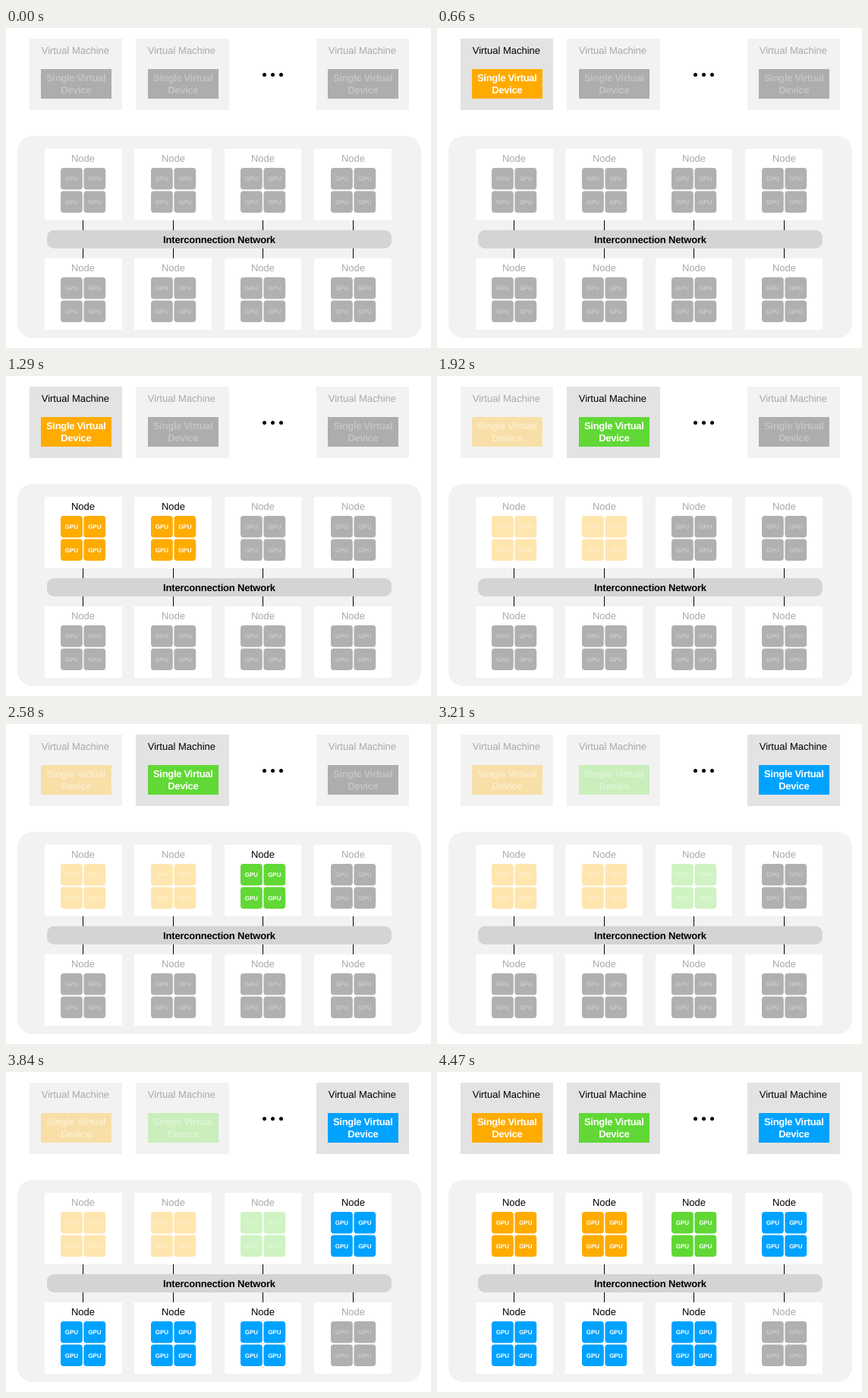
Recreate the animation shown at these times as an HTML page. Size 560 px wide and 421 px high, loop 5130 ms.

```html
<!DOCTYPE html>
<html lang="en">
<head>
<meta charset="utf-8">
<title>Virtual devices on a GPU cluster</title>
<style>
  html, body { margin: 0; width: 100%; height: 100%; overflow: hidden; background: #fff; }
  svg { display: block; width: 560px; height: 421px; }
  text {
    font: 13px "Liberation Sans", Arial, sans-serif;
    text-anchor: middle;
    text-rendering: geometricPrecision;
  }
  .bold { font-weight: 700; letter-spacing: -.3px; }
  .net { font-weight: 700; letter-spacing: -.2px; }
  .gpu { font-size: 8px; font-weight: 700; }
</style>
</head>
<body>
<svg id="stage" viewBox="0 0 560 421"></svg>
<script>
const stage = document.getElementById('stage');

function add(tag, attrs, label) {
  const el = document.createElementNS('http://www.w3.org/2000/svg', tag);
  for (const k in attrs) el.setAttribute(k, attrs[k]);
  if (label) el.textContent = label;
  return stage.appendChild(el);
}
const rect = (x, y, width, height, fill, rx = 0) => add('rect', { x, y, width, height, fill, rx });
const text = (x, y, label, cls = '') => add('text', { x, y, class: cls }, label);
const paint = (list, color) => list.forEach(el => el.setAttribute('fill', color));

// Per hue: full colour, faded box, faded box text, faded GPU, faded GPU text
const HUES = {
  orange: ['#ffab00', '#f8dfa8', '#fbeccb', '#ffe5ae', '#fff0d0'],
  green: ['#61d836', '#caeebc', '#def4d5', '#cff3c2', '#e1f8d9'],
  blue: ['#00a2ff', '#a8d9f6', '#cbe8f9', '#aee0ff', '#d0edff']
};
const GREY = ['', '#adadad', '#c4c4c4', '#b0b0b0', '#cbcbcb'];
const MUTED = '#a9a9a9';

function addMachine(x, width, hue) {
  const panel = rect(x, 14, width, 94);
  const title = text(x + 60.4, 34, 'Virtual Machine');
  const left = x === 31 ? 46 : x === 171 ? 187 : 424;
  const box = rect(left, 54, 93, 39);
  const lines = [text(left + 46.3, 70, 'Single Virtual', 'bold'),
                 text(left + 46.3, 86, 'Device', 'bold')];
  return state => {
    const on = state === '1', tone = state === '2' ? HUES[hue] : GREY;
    paint([panel], on ? '#e3e3e3' : '#f2f2f2');
    paint([title], on ? '#000' : MUTED);
    paint([box], on ? HUES[hue][0] : tone[1]);
    paint(lines, on ? '#fff' : tone[2]);
  };
}

function addNode(col, row, hue) {
  const x = [51, 169, 288, 406][col], y = row ? 303 : 159;
  const left = [72, 191, 309, 428][col], mid = left + 29.5;
  rect(x, y, col % 2 || !col ? 102 : 101, 94, '#fff');
  const title = text(mid, y + 17.2, 'Node');
  const cells = [], labels = [];
  for (const dy of [25, 55.4])
    for (const dx of [0, 30.4]) {
      cells.push(rect(left + dx, y + dy, 28.8, 28.6, '', 4));
      labels.push(text(left + dx + 14.4, y + dy + 17.1, 'GPU', 'gpu'));
    }
  return state => {
    const on = state === '1', tone = state === '2' ? HUES[hue] : GREY;
    paint([title], on ? '#000' : MUTED);
    paint(cells, on ? HUES[hue][0] : tone[3]);
    paint(labels, on ? '#fff' : tone[4]);
  };
}

const parts = [
  addMachine(31, 122, 'orange'),
  addMachine(171, 123, 'green'),
  addMachine(409, 122, 'blue')
];
for (const cx of [340.5, 351.5, 362.5]) add('circle', { cx, cy: 61.5, r: 2.5 });

rect(15, 142, 532, 266, '#f2f2f2', 20);
['orange', 'orange', 'green', 'blue', 'blue', 'blue', 'blue', 'blue']
  .forEach((hue, i) => parts.push(addNode(i % 4, i >> 2, hue)));

for (const x of [101, 220, 338, 457]) rect(x, 253, 1, 50, '#000');
rect(54, 266, 454, 24, '#d4d4d4', 9);
text(281, 283, 'Interconnection Network', 'net');

// Start time, then 3 machines and 8 nodes: 0 idle, 1 active, 2 faded
const STEPS = [
  [0, '00000000000'],
  [660, '10000000000'],
  [1290, '10011000000'],
  [1920, '21022000000'],
  [2580, '21022100000'],
  [3210, '22122200000'],
  [3840, '22122211110'],
  [4470, '11111111110']
];
const LOOP = 5130;
let shown;

function draw(now) {
  const t = now % LOOP;
  const states = STEPS.filter(s => s[0] <= t).pop()[1];
  if (states !== shown) {
    parts.forEach((set, i) => set(states[i]));
    shown = states;
  }
}

const start = performance.now();
function tick() {
  draw(performance.now() - start);
  requestAnimationFrame(tick);
}
tick();
</script>
</body>
</html>
```
